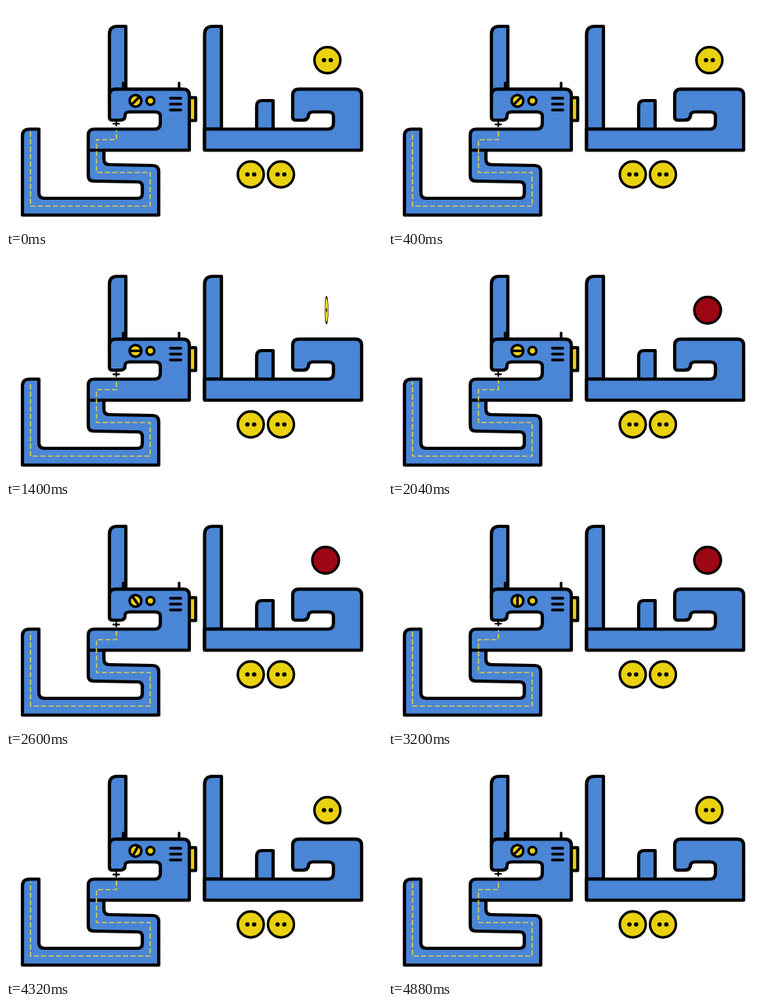
An HTML page that plays this animation: 480x284 px, repeating every 4.92 s.

```html
<!DOCTYPE html>
<html lang="fa">
<head>
<meta charset="utf-8">
<style>
  html, body { margin: 0; width: 100%; height: 100%; overflow: hidden; background: #fff; }
  svg { display: block; width: 100vw; height: 100vh; stroke-linejoin: round; }
  .cloth { fill: #4a85d6; stroke: #000; stroke-width: 4.2; }
  .yellow { fill: #e9d110; stroke: #000; stroke-width: 3.2; }
  .line { fill: none; stroke: #000; stroke-width: 3.3; stroke-linecap: round; }
  .thread { fill: none; stroke: #d6c953; stroke-width: 1.7; stroke-dasharray: 6.5 3; }
</style>
</head>
<body>
<svg viewBox="0 0 480 284">
  <defs>
    <g id="button">
      <circle class="yellow" r="16.6"/>
      <circle cx="-4.3" r="2.8"/>
      <circle cx="4.3" r="2.8"/>
    </g>
  </defs>

  <!-- right-hand letters -->
  <path class="cloth" d="M253.5 184V36Q253.5 26 264 26H275V157.5H254"/>
  <path class="cloth" d="M320 157.5V128Q320 121 327 121H341V157.5"/>
  <path class="cloth" d="M454 184.5V114Q454 106.3 446 106.3H374Q366 106.3 366 114V142Q366 146 370 146H379Q385 146 386 141Q386 135.5 392 135.5H411Q418 135.5 418 141V150Q418 157.5 411 157.5H253.5V184.5Z"/>

  <!-- tail -->
  <path class="cloth" d="M21 267.5V166Q21 157.5 30 157.5H42V239Q42 246 49 246H168Q174 246 174 240V231Q174 225 168 225L112 224Q105 224 105 217V184H125V196Q125 203 132 203L187 204Q195 204 195 212V267.5Z"/>

  <!-- sewing machine -->
  <path class="cloth" d="M132 118V36Q132 26 142 26H153V108"/>
  <path class="line" d="M149.5 98.5V106M221 98.5V106"/>
  <rect class="yellow" style="stroke-width:4" x="233.5" y="117.3" width="8.7" height="29.2"/>
  <path class="cloth" d="M132 142V114Q132 106.3 140 106.3H226Q234 106.3 234 114V184.5H105V165Q105 157.5 113 157.5H190Q197 157.5 197 150V141Q197 135.5 190 135.5H158Q152 135.5 152 140Q152 146 146 146H136Q132 146 132 142Z"/>
  <path class="line" d="M209.8 118H223.3M209.8 125.5H223.3M209.8 133H223.3"/>
  <g transform="translate(165.3 121.3)">
    <circle class="yellow" r="7.5"/>
    <path id="dial" class="line" d="M-6.5 0H6.5"/>
  </g>
  <circle class="yellow" cx="184.4" cy="121.3" r="5"/>

  <path id="thread" class="thread" d="M31.3 161V256H184V213H115.5V171H141V159"/>
  <path id="needle" class="line" style="stroke-width:2.2" d="M140.8 146.5V153M137 150.5H144.5"/>

  <use href="#button" x="312.5" y="215.5"/>
  <use href="#button" x="351" y="215.5"/>
  <g id="coin">
    <use id="front" href="#button" x="1.3"/>
    <circle id="back" cx="1" r="17" fill="#9c0713" stroke="#000" stroke-width="3.2"/>
  </g>
</svg>
<script>
  const LOOP = 4920, STITCHES = 20, STITCH = 9.5;
  const get = id => document.getElementById(id);
  const [dial, thread, needle, coin, front, back] =
    ['dial', 'thread', 'needle', 'coin', 'front', 'back'].map(get);

  // Eased progress from 0 to 1 between two times
  function ease(t, start, end) {
    const p = Math.min(1, Math.max(0, (t - start) / (end - start)));
    return p * p * (3 - 2 * p);
  }

  function draw(now) {
    const t = now % LOOP;

    const flip = Math.cos(Math.PI * (ease(t, 930, 1930) + ease(t, 3290, 4290)));
    coin.setAttribute('transform', `translate(409 69.3) scale(${flip} 1)`);
    const showBack = flip < 0;
    front.style.display = showBack ? 'none' : '';
    back.style.display = showBack ? '' : 'none';

    const angle = -45 + 45 * ease(t, 600, 1300) + 90 * ease(t, 2200, 2900) + 45 * ease(t, 3900, 4600);
    dial.setAttribute('transform', `rotate(${angle})`);

    const stitch = t / LOOP * STITCHES;
    const dip = (1 - Math.cos(2 * Math.PI * stitch)) / 2;
    needle.setAttribute('transform', `translate(0 ${dip * 1.2})`);
    thread.style.strokeDashoffset = stitch * STITCH;

    requestAnimationFrame(draw);
  }
  draw(performance.now());
</script>
</body>
</html>
```
